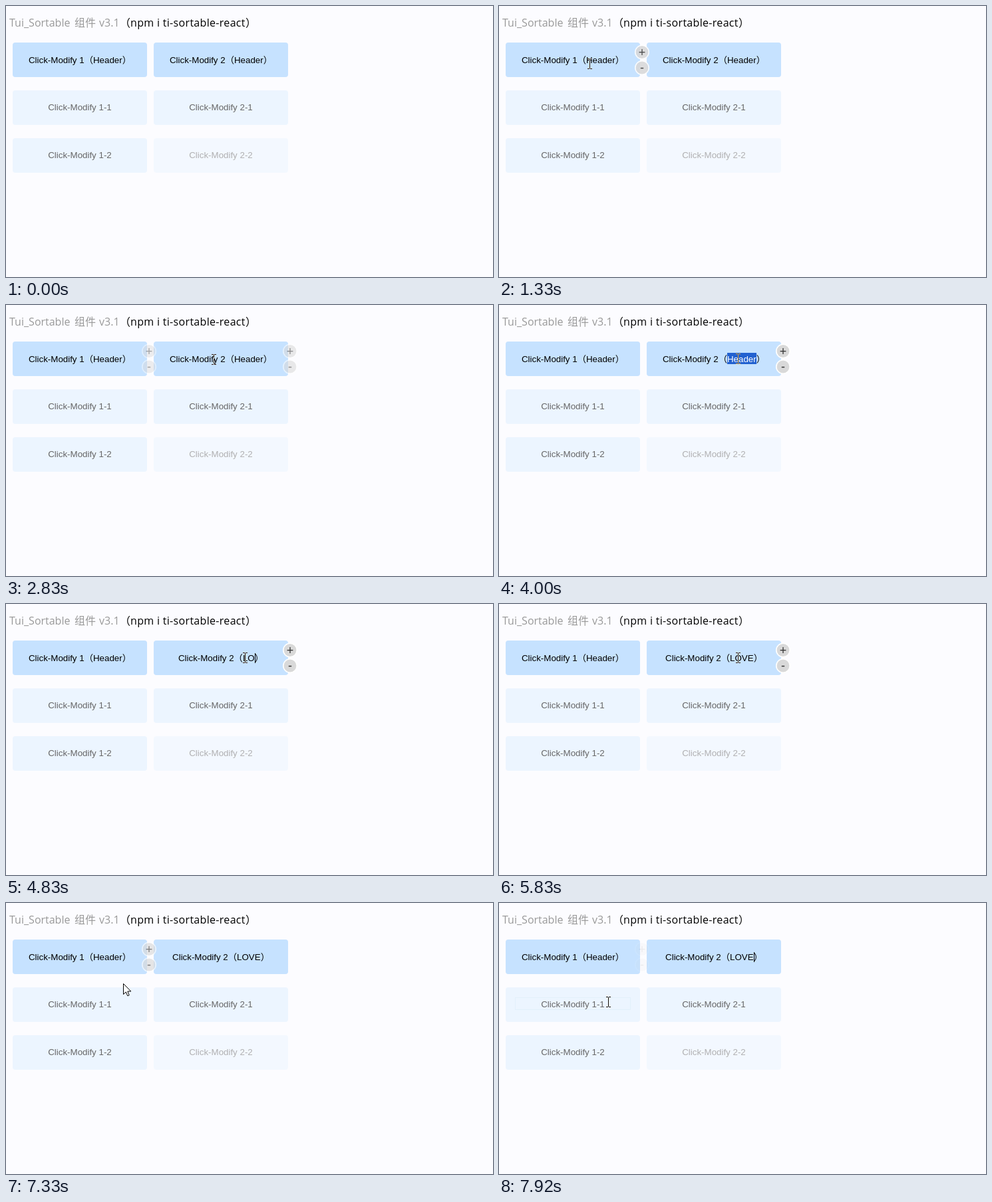
Write an HTML page that moves like this. It is 732 px wide and 408 px high and loops after 8 s.

```html
<!DOCTYPE html>
<html lang="zh">
<head>
<meta charset="utf-8">
<title>Sortable</title>
<style>
  html, body { margin: 0; width: 100%; height: 100%; overflow: hidden; background: #fcfcff; }
  svg { display: block; width: 732px; height: 408px; }
  text { white-space: pre; text-spacing-trim: space-all; }
  .title { font: 16px "Open Sans", "Noto Sans CJK SC", "Noto Sans CJK", sans-serif; }
  .cell { font: 13.333px "Liberation Sans", "Noto Sans CJK SC", "Noto Sans CJK", sans-serif; text-anchor: middle; }
  .sign { font: 18px "Liberation Sans", sans-serif; text-anchor: middle; fill: #333; }
  #beam { mix-blend-mode: difference; }
</style>
</head>
<body>
<svg id="stage" viewBox="0 0 732 408" xmlns="http://www.w3.org/2000/svg">
  <rect width="732" height="408" fill="#fcfcff"/>
  <g class="title">
    <g fill="#999">
      <text x="5" y="31">Tui_Sortable</text>
      <text x="103" y="31">组件</text>
      <text x="140" y="31">v3.1</text>
    </g>
    <text x="171" y="31">（</text>
    <text x="187" y="31" letter-spacing=".32">npm i ti-sortable-react</text>
    <text x="360" y="31">）</text>
  </g>
  <g id="cells"></g>
  <rect id="field" x="24.5" y="142.5" width="173" height="18" fill="none" stroke="#e2f0fb"/>
  <rect id="selection" x="343" y="72" width="44" height="17" fill="#2261d0"/>
  <text id="label" class="cell" x="323" y="86"><tspan>Click-Modify 2（</tspan><tspan id="word"></tspan><tspan>）</tspan></text>
  <rect id="caret" y="74" width="1" height="15"/>
  <g id="buttons"></g>
  <path id="arrow" d="M.5 .5V16.5L4.3 13 6.8 18.8 9.2 17.8 6.8 12H11.8Z" fill="#fff" stroke="#000"/>
  <path id="beam" d="M-3 -7.5H0M1 -7.5H4M.5 -7V7M-3 7.5H0M1 7.5H4" fill="none" stroke="#fff"/>
</svg>
<script>
const $ = id => document.getElementById(id);
const LOOP = 8000, TICKS_PER_MS = 0.012, TICKS = 96, FADE = 12;

function add(parent, tag, attrs, text = '') {
  const el = document.createElementNS('http://www.w3.org/2000/svg', tag);
  for (const key in attrs) el.setAttribute(key, attrs[key]);
  el.textContent = text;
  return parent.appendChild(el);
}

function addCell(col, row) {
  const x = 10 + col * 212, y = 55 + row * 72;
  const g = add($('cells'), 'g', { opacity: col && row === 2 ? 0.5 : 1 });
  add(g, 'rect', { x, y, width: 202, height: 52, rx: 4, fill: row ? '#ecf5ff' : '#c6e2ff' });
  // The second header's text is the editable label.
  const text = row ? `Click-Modify ${col + 1}-${row}` : col ? '' : 'Click-Modify 1（Header）';
  add(g, 'text', { x: x + 101, y: y + (row ? 30 : 31), class: 'cell', fill: row ? '#666' : '#000' }, text);
}

function addButtons(col) {
  const g = add($('buttons'), 'g', {}), x = 215 + col * 212;
  ['+', '-'].forEach((sign, i) => {
    const y = 69.5 + i * 23.5;
    add(g, 'circle', { cx: x, cy: y, r: 10.2, fill: '#d9d9d9', stroke: '#fff', 'stroke-width': 1.6 });
    add(g, 'text', { x, y: y + 6.2, class: 'sign' }, sign);
  });
  return g;
}

for (let row = 0; row < 3; row++) for (let col = 0; col < 2; col++) addCell(col, row);
const buttons = [0, 1].map(addButtons);

// Times are in ticks of 1/12 s.
const hovers = [[[8, 30], [81, 87]], [[30, 71]]];
const typed = [56, 58, 61, 63];
// Cursor stops: tick, x, y, and the sag of the move that leads there.
const stops = [
  [5, 122, 24, 0], [16, 136, 87, 0], [25, 153, 86, 0], [38, 359, 81, 0],
  [70, 359, 81, 0], [81, 188, 93, 26], [95, 164, 149, 0]
];

const clamp = u => Math.min(1, Math.max(0, u));
const easeOut = u => 1 - (1 - clamp(u)) ** 2;
const smooth = u => u * u * (3 - 2 * u);
const show = (el, on) => el.setAttribute('visibility', on ? 'visible' : 'hidden');

const hoverLevel = (k, [enter, leave]) =>
  easeOut((Math.min(k, leave) - enter) / FADE) * (1 - easeOut((k - leave) / FADE));

function cursorAt(k) {
  const i = Math.max(1, stops.findIndex(stop => stop[0] >= k));
  const [t0, x0, y0] = stops[i - 1], [t1, x1, y1, sag] = stops[i];
  const u = smooth(clamp((k - t0) / (t1 - t0)));
  return [x0 + (x1 - x0) * u, y0 + (y1 - y0) * u + sag * Math.sin(Math.PI * u)].map(Math.round);
}

function overText(x, y) {
  const inColumn = (x + 188) % 212 <= 174;
  const inRow = y >= 72 && (y - 72) % 70 <= 19;
  return y < 36 || (inColumn && inRow);
}

function drawCursor(k) {
  const [x, y] = cursorAt(k);
  const beam = overText(x, y);
  show($('beam'), k >= 5 && beam);
  show($('arrow'), k >= 5 && !beam);
  $(beam ? 'beam' : 'arrow').setAttribute('transform', `translate(${x} ${y})`);
}

function drawLabel(k) {
  const count = typed.filter(t => k >= t).length;
  const selected = k >= 48 && !count;
  $('word').textContent = count ? 'LOVE'.slice(0, count) : 'Header';
  $('word').setAttribute('fill', selected ? '#fff' : '#000');
  show($('selection'), selected);

  const blinkOn = k < 63 || Math.floor((k - 63) / 7) % 2 === 0;
  show($('caret'), (k >= 39 && k < 46) || (count && blinkOn));
  const label = $('label');
  const end = count ? label.getEndPositionOfChar(label.getNumberOfChars() - 2).x : 360;
  $('caret').setAttribute('x', Math.round(end));
}

function draw(ms) {
  const k = Math.floor((ms % LOOP + 5) * TICKS_PER_MS) % TICKS;
  buttons.forEach((g, i) =>
    g.setAttribute('opacity', Math.max(...hovers[i].map(span => hoverLevel(k, span)))));
  show($('field'), k >= 90);
  drawLabel(k);
  drawCursor(k);
}

const start = performance.now();
function frame() {
  draw(performance.now() - start);
  requestAnimationFrame(frame);
}
frame();
</script>
</body>
</html>
```
